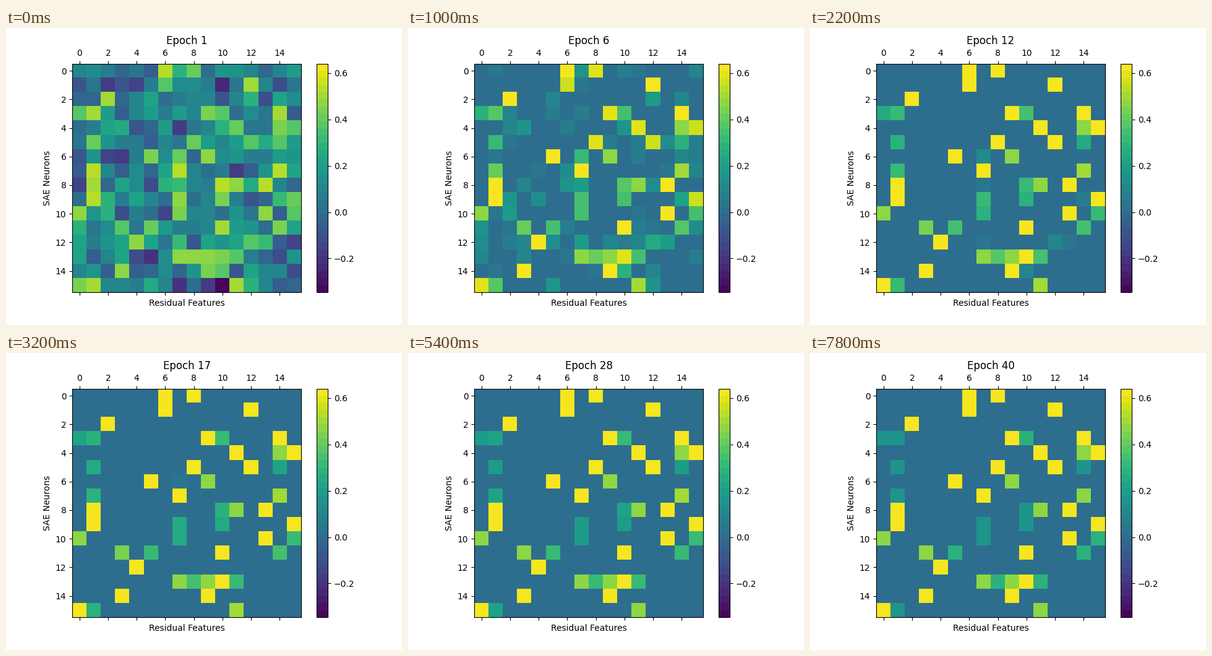
These frames come from a looping animation (640x480 px, 8 s). A matplotlib script:

```python
import numpy as np
import matplotlib.pyplot as plt
from matplotlib.animation import FuncAnimation
from matplotlib.colors import ListedColormap

SIZE = 16
EPOCHS = 40
VMIN, VMAX = -0.346, 0.64
SHADES = 32

# Weights that survive training: final level -> row -> columns.
# Levels above VMAX simply saturate the colour scale.
SURVIVORS = {
    .9: {0: (6, 8), 1: (6, 12), 2: (2,), 3: (9, 14), 4: (11, 15),
         5: (8, 12), 6: (5,), 7: (7,), 8: (1, 13), 9: (1, 15), 10: (13,),
         11: (10,), 12: (4,), 13: (10,), 14: (3, 9), 15: (0,)},
    .48: {4: (14,), 6: (9,), 7: (14,), 8: (11,), 10: (0,), 11: (3,),
          13: (7, 9), 15: (11,)},
    .29: {3: (10,), 10: (15,), 11: (5, 14), 13: (8, 11)},
    .15: {3: (0, 1), 5: (1, 14), 7: (1,), 8: (10,), 9: (7, 10), 10: (7,),
          15: (1,)},
}

rng = np.random.default_rng(7)
start = np.clip(rng.normal(.1, .14, (SIZE, SIZE)), VMIN, .42)
strong = rng.uniform(.36, .54, (SIZE, SIZE))
final = np.zeros((SIZE, SIZE))
for level, rows in SURVIVORS.items():
    for row, cols in rows.items():
        final[row, list(cols)] = level


def weights(epoch):
    t = epoch - 1
    # Weak weights: positives are soft-thresholded, negatives climb to zero.
    threshold = .42 * (1 - np.exp(-(t / 10.5) ** 1.6))
    weak = np.where(start > 0, np.maximum(start - threshold, 0),
                    np.minimum(start + .07 * t, 0))
    # Survivors ease from a strong start to their final level.
    ease = np.sqrt(t / (EPOCHS - 1))
    kept = strong + (final - strong) * ease
    return np.where(final > 0, kept, weak)


viridis = plt.get_cmap("viridis")
cmap = ListedColormap(viridis((np.arange(SHADES) + .5) / SHADES))

plt.rcParams["font.family"] = "DejaVu Sans"
fig, ax = plt.subplots(figsize=(6.4, 4.8), dpi=100)
image = ax.matshow(weights(1), cmap=cmap, vmin=VMIN, vmax=VMAX)
fig.colorbar(image)
ax.set_xlabel("Residual Features")
ax.set_ylabel("SAE Neurons")
title = ax.set_title("Epoch 1")


def update(i):
    image.set_data(weights(i + 1))
    title.set_text(f"Epoch {i + 1}")
    return image, title


anim = FuncAnimation(fig, update, frames=EPOCHS, interval=200, repeat=True)
plt.show()
```
